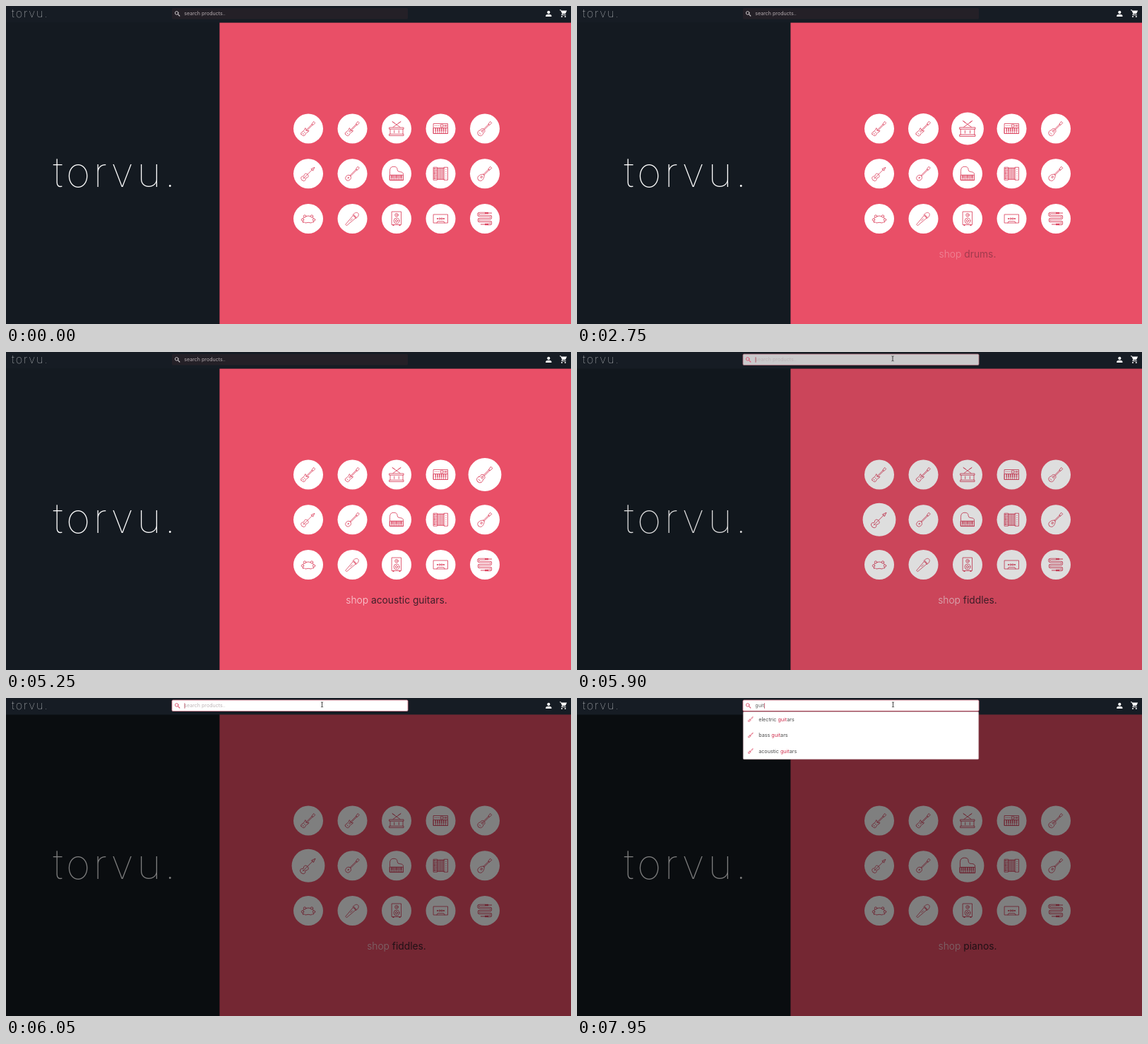
Recreate the animation shown at these times as an HTML page. Size 800 px wide and 450 px high, loop 8000 ms.

```html
<!DOCTYPE html>
<html lang="en">
<head>
<meta charset="utf-8">
<title>Music shop</title>
<style>
  html, body { margin: 0; width: 100%; height: 100%; overflow: hidden; background: #141a21; }
  svg { display: block; width: 800px; height: 450px; font-family: Inter, "Open Sans", sans-serif; }
  text { white-space: pre; }
  .icon { fill: none; stroke: #dc4560; stroke-width: .85; stroke-linejoin: round; stroke-linecap: round; }
  .solid { fill: #dc4560; stroke: none; }
</style>
</head>
<body>
<svg viewBox="0 0 800 450">
  <rect width="800" height="450" fill="#141a21"/>
  <rect x="302.4" y="23.4" width="498" height="427" fill="#e94f67"/>
  <text x="66.5" y="255.5" font-size="59" font-weight="100" letter-spacing="4.6" fill="#fff">torvu.</text>
  <g id="products"></g>
  <text id="caption" x="553" y="355.5" font-size="13.8" font-weight="300" text-anchor="middle" fill="#fbd3da">shop <tspan font-weight="400" fill="#40202b"></tspan></text>
  <rect id="shade" y="23.4" width="800" height="427"/>

  <rect width="800" height="23.4" fill="#161c24"/>
  <text x="8" y="16" font-size="16.4" font-weight="100" letter-spacing="1.8" fill="#e0e2e4">torvu.</text>
  <g fill="#fff">
    <circle cx="768.3" cy="8.9" r="2.1"/>
    <path d="M764.2 15v-1.2q0-2 4.1-2t4.1 2V15z"/>
    <path d="M786 6.6h8.2l-2.2 4.4h-4.3z"/>
    <circle cx="787" cy="15" r="1"/><circle cx="791.8" cy="15" r="1"/>
    <path d="M784 5.8h1.6l2.2 4.8-1 2h6" fill="none" stroke="#fff"/>
  </g>

  <rect x="235" y="3" width="334" height="15.5" rx="1.5" fill="#242027"/>
  <rect id="field" x="235" y="3" width="334" height="15.5" rx="1.5" fill="#fff" stroke="#e58a9b" stroke-width=".8"/>
  <g id="lens" fill="none" stroke-linecap="round"><circle cx="241.7" cy="9.9" r="2.3"/><path d="M243.5 11.7l2.3 2.3" stroke-width="1.2"/></g>
  <text id="query" x="252.3" y="13.4" font-size="7.1"></text>
  <rect id="caret" y="7.2" width=".8" height="7.6" fill="#b03c52"/>

  <g id="menu">
    <rect x="235.3" y="19.2" width="333.4" height="67.5" rx="1.5" fill="#fff" stroke="#c9a5ac" stroke-width=".6"/>
    <path d="M235 18.7H569" stroke="#a3354a" stroke-width=".9"/>
  </g>

  <path id="arrow" d="M0 0V9.5L2.3 7.4 3.8 10.7 5.2 10 3.8 6.9H7z" fill="#000" stroke="#fff" stroke-width=".7"/>
  <path id="beam" d="M-1.5 -3.5Q0 -3.5 0 -2.5Q0 -3.5 1.5 -3.5M0 -2.5V2.5M-1.5 3.5Q0 3.5 0 2.5Q0 3.5 1.5 3.5" fill="none" stroke="#333" stroke-width=".9"/>
</svg>
<script>
const LOOP = 8000;
const byId = id => document.getElementById(id);
const clamp = x => Math.max(0, Math.min(1, x));
const progress = (t, start, length) => clamp((t - start) / length);
const easeOut = x => 1 - (1 - x) ** 3;
const show = (node, visible) => node.setAttribute("visibility", visible ? "visible" : "hidden");

// Icon drawing helpers; every icon is centred on 0,0 and about 20 units wide.
const path = (d, solid) => `<path d="${d}"${solid ? ' class="solid"' : ""}/>`;
const box = (x, y, w, h, solid) => path(`M${x} ${y}h${w}v${h}h${-w}z`, solid);
const dot = (x, y, r, solid) => `<circle cx="${x}" cy="${y}" r="${r}"${solid ? ' class="solid"' : ""}/>`;
const row = (count, draw) => Array.from({ length: count }, (_, i) => draw(i)).join("");
const tilt = content => `<g transform="rotate(-45) scale(.98 .85)">${content}</g>`;
const neck = (from, to) => box(from, -.8, to - from, 1.6) + path(`M${to} -1.3L${to + 4.3} -2V1.5L${to} 1.3z`);
const keys = (x, y, width, height, count) => box(x, y, width, height) + row(count - 1, i => {
  const kx = x + (i + 1) * width / count;
  return path(`M${kx} ${y}v${height}`) + box(kx - .6, y, 1.2, height * .6, true);
});

const solidBody = "M-13 -1.5Q-13 -4.3 -10 -3.5Q-7 -2.5 -5.5 -3L-2.5 -4.3Q-1.8 -3.4 -3.2 -1.5V1.5L-1.5 3.2Q-3 4.3 -5.5 3Q-8 2.7 -10 3.8Q-13.5 4 -13 -1.5z";
const icons = {
  electric: tilt(path(solidBody) + neck(-4, 8.5) + path("M-10.5 -1.3V1.3M-7.5 -1.3V1.3")),
  bass: tilt(path(solidBody) + neck(-6, 8.5) + path("M-10 -1.3V1.3")),
  drum: box(-10, -1.5, 20, 2.2) + box(-10, 7.8, 20, 2.2) + path("M-9 .7V7.8M9 .7V7.8M-3.3 2.5V6M3.3 2.5V6") +
    path("M-5.5 -9.5L5 -2M5.5 -9.5L-5 -2") + path("M-6 -10l3.2 2.2M6 -10l-3.2 2.2"),
  keyboard: box(-10, -7, 20, 14) + row(4, i => dot(-8 + i * 1.7, -4, .5, true)) +
    box(0, -5.5, 3.5, 3) + row(3, i => box(5 + i * 1.5, -5.5, .8, 3, true)) + keys(-10, -1, 20, 8, 7),
  acoustic: tilt(path("M-13 0C-13 -5.5 -7.5 -5.5 -6.3 -3.1C-4.5 -4.6 -1.5 -3.6 -1.5 0C-1.5 3.6 -4.5 4.6 -6.3 3.1C-7.5 5.5 -13 5.5 -13 0z") +
    dot(-5, 0, 1.4) + neck(-1.5, 8.5) + path("M-10 -1.5V1.5")),
  fiddle: tilt(path("M-13 0C-13 -5 -9 -5 -8.2 -3L-6.8 -2.2L-5.5 -3.2C-4 -4.5 -1.5 -3.5 -1.5 0C-1.5 3.5 -4 4.5 -5.5 3.2L-6.8 2.2L-8.2 3C-9 5 -13 5 -13 0z") +
    path("M-10 0H9M-8.5 -1.2V1.2") + path("M8 -2L13 0L8 2z")),
  banjo: tilt(dot(-8.5, 0, 4.3) + dot(-8.5, 0, .9) + neck(-4.2, 8.5)),
  piano: path("M-9.5 9V-4Q-9.5 -10 -4 -10Q1 -10 1 -6Q1 -2.5 5 -2.5Q9.5 -2.5 9.5 1V9z") + keys(-9.5, 2, 19, 7, 8),
  accordion: box(-10, -9, 5, 18) + row(7, i => path(`M-10 ${-7 + i * 2.3}h5`) + box(-10, -7.6 + i * 2.3, 2.5, 1, true)) +
    row(5, i => path(`M${-3.5 + i * 1.8} -8V8`)) + path("M-5 -8H5M-5 8H5") + box(5, -9, 5, 18) +
    row(5, i => dot(7.5, -6 + i * 3, .6, true)),
  mandolin: tilt(path("M-13 0C-13 -6 -6.5 -6 -2 -1V1C-6.5 6 -13 6 -13 0z") + dot(-7, 0, 1.4) + neck(-2, 8.5)),
  tambourine: path("M-7.5 5Q-10 -3.5 0 -4Q10 -3.5 7.5 5Q5 4.5 4 6Q0 4.5 -4 6Q-5 4.5 -7.5 5z") +
    [[-8, 1.5], [-5, -3.5], [5, -3.5], [8, 1.5]].map(([x, y]) =>
      `<circle cx="${x}" cy="${y}" r="1.7" fill="#fff"/>`).join(""),
  microphone: tilt(path("M4 -3L-13 -1.3V1.3L4 3z") + path("M4 -4V4M5.5 -4V4M5.5 -4C13.5 -5 13.5 5 5.5 4") +
    path("M-4 0H0")),
  speaker: box(-6.5, -10, 13, 18.5) + dot(0, -5.2, 2.3) + dot(0, -5.2, .8, true) + dot(0, 3, 3.9) + dot(0, 3, 1.6) +
    box(-5.5, 8.5, 2, 1.5, true) + box(3.5, 8.5, 2, 1.5, true),
  amplifier: box(-10, -6, 20, 12) + row(4, i => dot(-4.5 + i * 3, 0, 1.1, i % 3 === 0)) + path("M-5.5 6L-4.5 3.8H4.5L5.5 6"),
  cable: ["#dc4560", "#fff"].map((color, i) =>
    `<path d="M0 -8H-7Q-9.5 -8 -9.5 -6T-7 -4H7Q9 -4 9 -2T7 0H-7Q-9 0 -9 2T-7 4H7Q9 4 9 6T7 8H5" stroke="${color}" stroke-width="${2.4 - i * 1.4}"/>`).join("") +
    box(0, -9.2, 5, 2.4, true) + box(5, -8.5, 5, 1, true) + box(0, 6.8, 5, 2.4, true) + box(-6, 7.5, 6, 1, true)
};

byId("products").innerHTML = Object.values(icons).map((drawing, i) => {
  const x = 428 + i % 5 * 62.5, y = 173.5 + Math.floor(i / 5) * 63.75;
  return `<g transform="translate(${x} ${y})"><g><circle r="21" fill="#fff"/><g class="icon">${drawing}</g></g></g>`;
}).join("");
const badges = [...byId("products").children].map(node => node.firstChild);

byId("menu").innerHTML += ["electric", "bass", "acoustic"].map((kind, i) => {
  const y = 30 + i * 22.5;
  return `<g class="icon" style="stroke-width:1.5" transform="translate(246 ${y}) scale(.36)">${icons[kind]}</g>
    <text x="257.2" y="${y + 2.6}" font-size="7.2" fill="#484848">${kind} <tspan fill="#cf2f4e"></tspan><tspan></tspan></text>`;
}).join("");
const matches = [...byId("menu").querySelectorAll("text")].map(text => text.querySelectorAll("tspan"));

const products = ["electric guitars", "bass guitars", "drums", "keyboards", "acoustic guitars", "fiddles", "banjos", "pianos"];
const FADE_OUT = 100;
const switchTime = i => 700 + i * 1000;
const FOCUS = 5840;
const keyTimes = [6900, 7150, 7700, 7850];
const word = "guitars";
const caption = byId("caption");

function renderCarousel(t) {
  const growth = i => easeOut(progress(t, switchTime(i) - FADE_OUT / 2, 250));
  const active = products.findLastIndex((_, i) => t >= switchTime(i));
  badges.forEach((badge, i) => {
    let size = 0;
    if (i < products.length) size = growth(i) - growth(i + 1);
    badge.setAttribute("transform", `scale(${1 + .115 * size})`);
  });
  const fadeIn = easeOut(progress(t, switchTime(active), 300));
  const fadeOut = progress(t, switchTime(active + 1) - FADE_OUT, FADE_OUT);
  caption.setAttribute("opacity", active < 0 ? 0 : fadeIn * (1 - fadeOut));
  caption.lastChild.textContent = active < 0 ? "" : products[active] + ".";
}

function renderSearch(t) {
  const focused = t >= FOCUS;
  const typed = keyTimes.filter(time => t >= time).length;
  const query = byId("query");
  byId("shade").setAttribute("opacity", .5 * progress(t, 5850, 200));
  byId("field").setAttribute("opacity", progress(t, FOCUS, 80));
  byId("lens").setAttribute("stroke", focused ? "#e0607a" : "#c9c4c7");
  query.textContent = typed ? word.slice(0, typed) : "search products..";
  query.setAttribute("fill", typed ? "#666" : focused ? "#bdb3b6" : "#b5acb0");

  const lastAction = typed ? keyTimes[typed - 1] : FOCUS;
  const caret = byId("caret");
  caret.setAttribute("x", 252.6 + (typed ? query.getComputedTextLength() : 0));
  show(caret, focused && (t - lastAction) % 1000 < 510);

  byId("menu").setAttribute("opacity", progress(t, keyTimes[0] - 50, 100) * (typed > 0));
  for (const [hit, rest] of matches) {
    hit.textContent = word.slice(0, typed);
    rest.textContent = word.slice(typed);
  }
}

function renderPointer(t) {
  const move = easeOut(progress(t, 5320, 560));
  const x = 742 - 295 * move + .5 * progress(t, 5960, 60);
  const y = -3 + 12.3 * move + 5 * Math.sin(Math.PI * move);
  const overField = x < 569;
  for (const [id, visible] of [["arrow", !overField], ["beam", overField]]) {
    const node = byId(id);
    node.setAttribute("transform", `translate(${x} ${y})`);
    show(node, visible && t >= 5340);
  }
}

function frame(now) {
  const t = now % LOOP;
  renderCarousel(t);
  renderSearch(t);
  renderPointer(t);
  requestAnimationFrame(frame);
}
requestAnimationFrame(frame);
</script>
</body>
</html>
```
